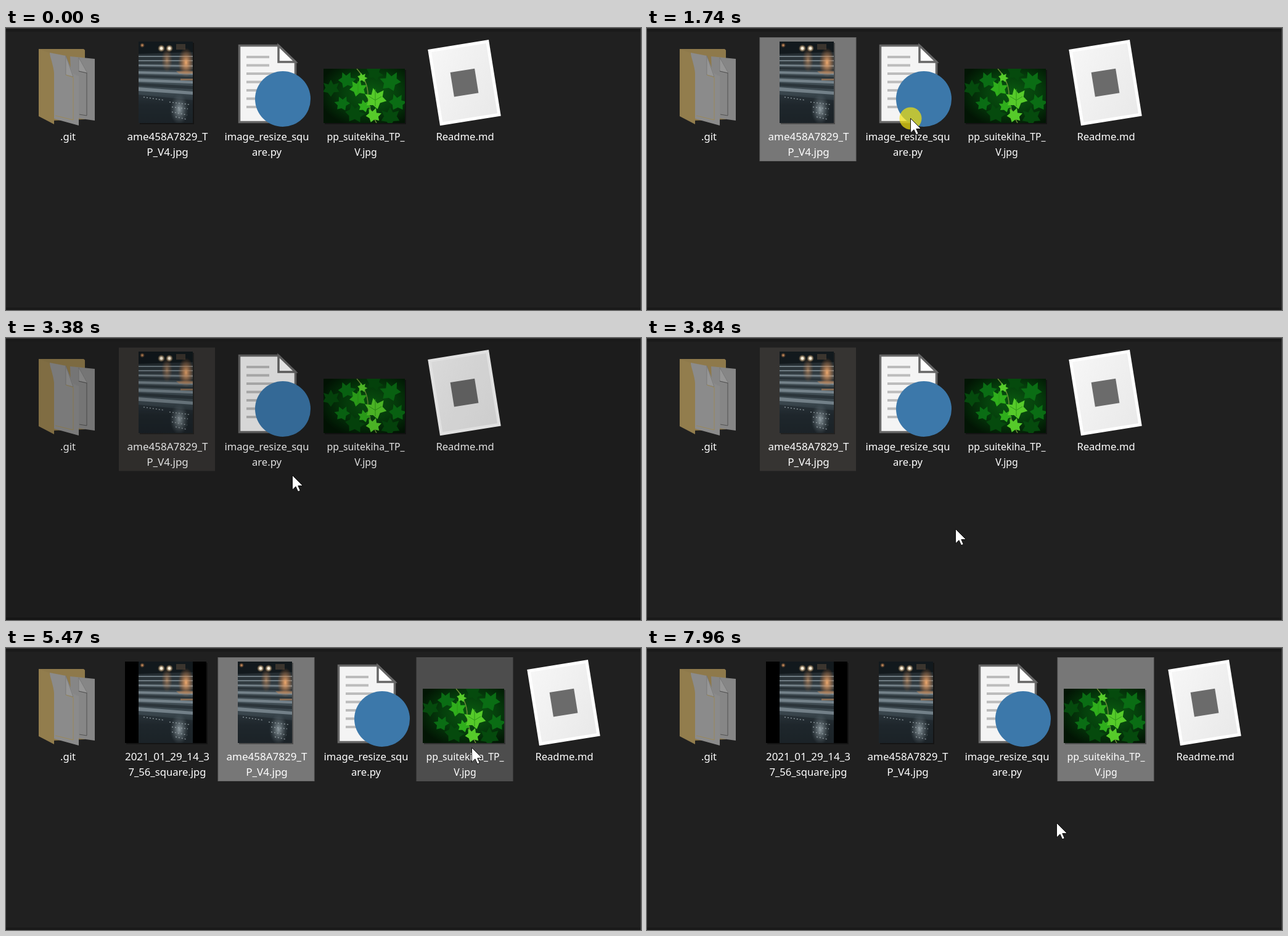
Write an HTML page that moves like this. It is 1030x457 px and loops after 8 s.

```html
<!DOCTYPE html>
<html lang="en">
<head>
<meta charset="utf-8">
<title>File drag and drop</title>
<style>
html, body { margin: 0; width: 100%; height: 100%; overflow: hidden; background: #202020; }
svg { display: block; }
text { font-family: "Noto Sans", "Open Sans", sans-serif; font-size: 16.6px; fill: #fff; text-anchor: middle; }
.wide { font-size: 17px; }
.narrow { font-size: 15.8px; }

/* Percentages are time / 80 ms */
.step { animation: 8s step-end infinite; }
.cell { fill: transparent; stroke: transparent; }
#pointer { animation: move 8s linear infinite; }
#shifted { animation-name: shift; }
#created { animation-name: created; }
#cellRain { animation-name: rain; }
#cellScript { animation-name: script; }
#cellLeaf { animation-name: leaf; }
#dim { animation-name: dim; }
#press { animation-name: press; }
#ghostRain { animation-name: ghostRain; }
#ghostLeaf { animation-name: ghostLeaf; }

@keyframes move {
  0%, .8% { transform: translate(846px, 470px); }
  .9% { transform: translate(843px, 440px); }
  5% { transform: translate(640px, 300px); }
  10.25% { transform: translate(465px, 201px); }
  14.5% { transform: translate(290px, 152px); }
  16.2%, 17.3% { transform: translate(275px, 146px); }
  20.8% { transform: translate(412px, 147px); }
  21.75%, 29.6% { transform: translate(427px, 146px); }
  34.5%, 41.3% { transform: translate(450px, 155px); }
  42.25%, 43.2% { transform: translate(464px, 222px); }
  46.1%, 58.7% { transform: translate(500px, 309px); }
  68.3%, 81.2% { transform: translate(755px, 161px); }
  86.85%, 87.7% { transform: translate(739px, 193px); }
  90.6% { transform: translate(640px, 205px); }
  92.6%, 96.6% { transform: translate(613px, 154px); }
  99.5%, 100% { transform: translate(664px, 283px); }
}
@keyframes shift { 0% { transform: none; } 58.75%, 100% { transform: translate(161px, 0); } }
@keyframes created { 0% { opacity: 0; } 58.75%, 100% { opacity: 1; } }
@keyframes rain {
  0% { fill: transparent; stroke: transparent; }
  13.3% { fill: #4d4d4d; stroke: #4d4d4d; }
  16.6% { fill: #777; stroke: #666; }
  41.35% { fill: #363432; stroke: transparent; }
  49% { fill: #777; stroke: #666; }
  77.25%, 100% { fill: transparent; stroke: transparent; }
}
@keyframes script {
  0%, 13.1%, 38.25% { fill: transparent; stroke: transparent; }
  9.6%, 30% { fill: #4d4d4d; stroke: #4d4d4d; }
  90%, 96.5% { fill: #4d4d4d; stroke: #4d4d4d; }
  96.6%, 100% { fill: transparent; stroke: transparent; }
}
@keyframes leaf {
  0% { fill: transparent; stroke: transparent; }
  65% { fill: #4d4d4d; stroke: #4d4d4d; }
  77.25%, 100% { fill: #777; stroke: #666; }
}
@keyframes dim { 0%, 48%, 100% { opacity: 0; } 41.35% { opacity: .12; } }
@keyframes press { 0%, 38.25%, 96.6%, 100% { opacity: 0; } 16.6%, 79.1% { opacity: 1; } }
@keyframes ghostRain { 0%, 38.25%, 100% { opacity: 0; } 30% { opacity: 1; } }
@keyframes ghostLeaf { 0%, 96.6%, 100% { opacity: 0; } 82% { opacity: 1; } }
</style>
</head>
<body>
<svg width="1030" height="457" viewBox="0 0 1030 457">
  <defs>
    <linearGradient id="road" x2="0" y2="1">
      <stop offset="0" stop-color="#10171c"/><stop offset=".2" stop-color="#2b3439"/>
      <stop offset=".45" stop-color="#46535a"/><stop offset=".65" stop-color="#38444b"/>
      <stop offset=".78" stop-color="#222b30"/><stop offset="1" stop-color="#1b2226"/>
    </linearGradient>
    <radialGradient id="glow"><stop stop-color="#eeaa70"/><stop offset="1" stop-color="#b36a35" stop-opacity="0"/></radialGradient>
    <radialGradient id="lamp"><stop offset=".25" stop-color="#fff6e2"/><stop offset="1" stop-color="#d79a50" stop-opacity="0"/></radialGradient>
    <radialGradient id="shine"><stop stop-color="#b7c4ca" stop-opacity=".75"/><stop offset="1" stop-color="#6b7a82" stop-opacity="0"/></radialGradient>
    <radialGradient id="hedge" cx=".58" cy=".45" r=".65">
      <stop stop-color="#0a5a10"/><stop offset=".5" stop-color="#05400c"/><stop offset="1" stop-color="#021504"/>
    </radialGradient>
    <linearGradient id="paper" x2="1" y2="1"><stop stop-color="#f6f6f6"/><stop offset="1" stop-color="#e9e9e9"/></linearGradient>
    <clipPath id="tall"><path d="M0 0h88v132H0z"/></clipPath>
    <clipPath id="flat"><path d="M0 0h132v88H0z"/></clipPath>
    <path id="ivy" d="M0 -17 5 -7 16 -10 12 0 17 8 6 9 0 18 -6 10 -16 8 -11 0 -15 -10 -5 -7Z"/>

    <g id="rainPhoto" clip-path="url(#tall)">
      <path d="M0 0h88v132H0z" fill="url(#road)"/>
      <path d="M0 0h88v17L0 20z" fill="#12191d"/>
      <path d="M61 4h15v9H61z" fill="#3b352e"/>
      <g fill="#8b99a1" opacity=".7">
        <path d="M0 23h88v2H0zM0 30h88v2H0zM0 37l88 1v3L0 40zM0 48l88 2v4L0 52zM0 60l88 4v4L0 65zM0 74l88 7v5L0 80z"/>
      </g>
      <g fill="#1d262b" opacity=".6">
        <path d="M0 42l88 2v3L0 45zM0 54l88 3v4L0 58zM0 67l88 5v5L0 72z"/>
      </g>
      <ellipse cx="77" cy="34" rx="13" ry="24" fill="url(#glow)"/>
      <ellipse cx="46" cy="30" rx="9" ry="20" fill="url(#glow)" opacity=".55"/>
      <path d="M61 48h27v4H66zM68 60h20v3H68z" fill="#c98c59" opacity=".5"/>
      <path d="M0 86l88 9v37H0z" fill="#1c2429" opacity=".55"/>
      <ellipse cx="66" cy="110" rx="15" ry="25" fill="url(#shine)"/>
      <path d="M8 90l34 5M50 98l32 4M54 106l26 3M54 114l25 5M60 122l18 4" stroke="#a2adb2" stroke-width="1.5" stroke-dasharray="2 3" opacity=".75"/>
      <circle cx="37" cy="11" r="6" fill="url(#lamp)"/><circle cx="50" cy="11" r="6" fill="url(#lamp)"/>
      <circle cx="6" cy="6" r="4" fill="url(#glow)"/>
    </g>

    <g id="leafPhoto" clip-path="url(#flat)">
      <path d="M0 0h132v88H0z" fill="url(#hedge)"/>
      <g fill="#0a6d14">
        <use href="#ivy" transform="translate(38 18) rotate(25) scale(.8)"/>
        <use href="#ivy" transform="translate(108 20) rotate(-20) scale(.95)"/>
        <use href="#ivy" transform="translate(120 54) rotate(30) scale(.8)"/>
        <use href="#ivy" transform="translate(30 56) rotate(-25) scale(.7)"/>
      </g>
      <g fill="#054a0d">
        <use href="#ivy" transform="translate(12 31) scale(.8)"/>
        <use href="#ivy" transform="translate(51 72) rotate(35) scale(.9)"/>
        <use href="#ivy" transform="translate(108 77) scale(.9)"/>
        <use href="#ivy" transform="translate(83 6) rotate(50) scale(.8)"/>
      </g>
      <path d="M54 0Q72 20 72 42T86 88" fill="none" stroke="#6e8a39" stroke-width="1.5"/>
      <g fill="#2fae1c">
        <use href="#ivy" transform="translate(56 31) rotate(15) scale(.8)"/>
        <use href="#ivy" transform="translate(66 60) rotate(-15) scale(.6)"/>
      </g>
      <g fill="#56cb2a">
        <use href="#ivy" transform="translate(84 48) rotate(-12)"/>
        <use href="#ivy" transform="translate(81 75) rotate(20) scale(.7)"/>
        <use href="#ivy" transform="translate(63 14) rotate(40) scale(.45)"/>
      </g>
      <path d="M84 33v28M74 45l10 6 10-6M56 20v21" fill="none" stroke="#2d9817"/>
    </g>

    <rect id="cell" y="15.5" width="156" height="200"/>
    <rect id="frame" x="-75.5" y="-136.5" width="155" height="154" rx="3" fill="#a0bccb" fill-opacity=".4" stroke="#b9cdd7" stroke-opacity=".55"/>
  </defs>

  <path d="M0 0h1030v457H0z" fill="#202020"/>
  <path d="M0 1h1030v5H0zM0 453h1030v4H0z" fill="#1a1a1a"/>
  <path d="M0 0h1030v1H0zM1029 0h1v457h-1z" fill="#3c3c3c"/>

  <g id="folder">
    <path d="M53 34H126l2 2V148L78 150 53 142z" fill="#8e794b"/>
    <path d="M104 46 144 50V150L108 145z" fill="#868686"/>
    <path d="M71 40 97 45 109 74 118 78V158L78 147z" fill="#8b8b8b"/>
    <path d="M97 45 109 79 97 76zM118 48l14 25-14-3z" fill="#969696" stroke="#6d6d6d" stroke-width=".6"/>
    <path d="M97 76 109 80V149L80 142" fill="none" stroke="#a08a4c" stroke-width=".8"/>
    <path d="M118 70 131 73V142L119 140" fill="none" stroke="#444" stroke-width=".8"/>
    <path d="M53 34 70 40Q78 66 78 74V156L53 143z" fill="#927d4d"/>
    <text x="100.5" y="182">.git</text>
  </g>

  <g id="created" class="step">
    <path d="M195 24h132v132H195z" opacity=".35"/>
    <path d="M193 22h132v132H193z"/>
    <use href="#rainPhoto" x="215" y="22"/>
    <text class="wide" x="261.5" y="182">2021_01_29_14_3</text>
    <text x="261.5" y="207">7_56_square.jpg</text>
  </g>

  <g id="shifted" class="step">
    <use id="cellRain" class="cell step" href="#cell" x="183"/>
    <path d="M217 24h88v132h-88z" opacity=".35"/>
    <use href="#rainPhoto" x="215" y="22"/>
    <text class="wide" x="262" y="182">ame458A7829_T</text>
    <text class="wide" x="262" y="207">P_V4.jpg</text>

    <use id="cellScript" class="cell step" href="#cell" x="344"/>
    <path d="M378.5 28.5H442L469.5 55V152.5H378.5z" fill="#f4f4f4" stroke="#666" stroke-width="3.5"/>
    <path d="M442 28.5V55H469.5z" fill="#fff" stroke="#666" stroke-width="3.5"/>
    <path d="M390 47h37M390 60.5h37M390 74h66M390 87.5h66M390 101h66M390 114.5h66M390 128h66" stroke="#bcbcbc" stroke-width="4"/>
    <circle cx="449" cy="115" r="45" fill="#3c78aa"/>
    <text x="423" y="182">image_resize_squ</text>
    <text x="423" y="207">are.py</text>

    <use id="cellLeaf" class="cell step" href="#cell" x="505"/>
    <path d="M517 68h132v88H517z" opacity=".35"/>
    <use href="#leafPhoto" x="515" y="66"/>
    <text class="narrow" x="583.5" y="182">pp_suitekiha_TP_</text>
    <text class="narrow" x="583.5" y="207">V.jpg</text>

    <g transform="translate(743.5 88.7) rotate(-9.1)">
      <path d="M-50-62.5H50V62.5H-50z" fill="#fff"/>
      <path d="M-45-57.5H45V57.5H-45z" fill="url(#paper)"/>
      <path d="M-20-20H20V20H-20z" fill="#6b6b6b"/>
    </g>
    <text x="744.5" y="182">Readme.md</text>
  </g>

  <path id="dim" class="step" d="M0 6h1029v451H0z" opacity="0"/>

  <g id="pointer">
    <g id="ghostRain" class="step">
      <use href="#frame"/>
      <use href="#rainPhoto" x="-42" y="-129" opacity=".8"/>
    </g>
    <g id="ghostLeaf" class="step">
      <use href="#frame"/>
      <use href="#leafPhoto" x="-68" y="-84" opacity=".8"/>
    </g>
    <circle id="press" class="step" cx=".5" cy=".5" r="18" fill="#f0e010" fill-opacity=".72"/>
    <path d="M.5.5V24L6 18.8 9.7 27 13.3 25.3 9.8 17.5H17.5z" fill="#fff" stroke="#111"/>
  </g>
</svg>
</body>
</html>
```
